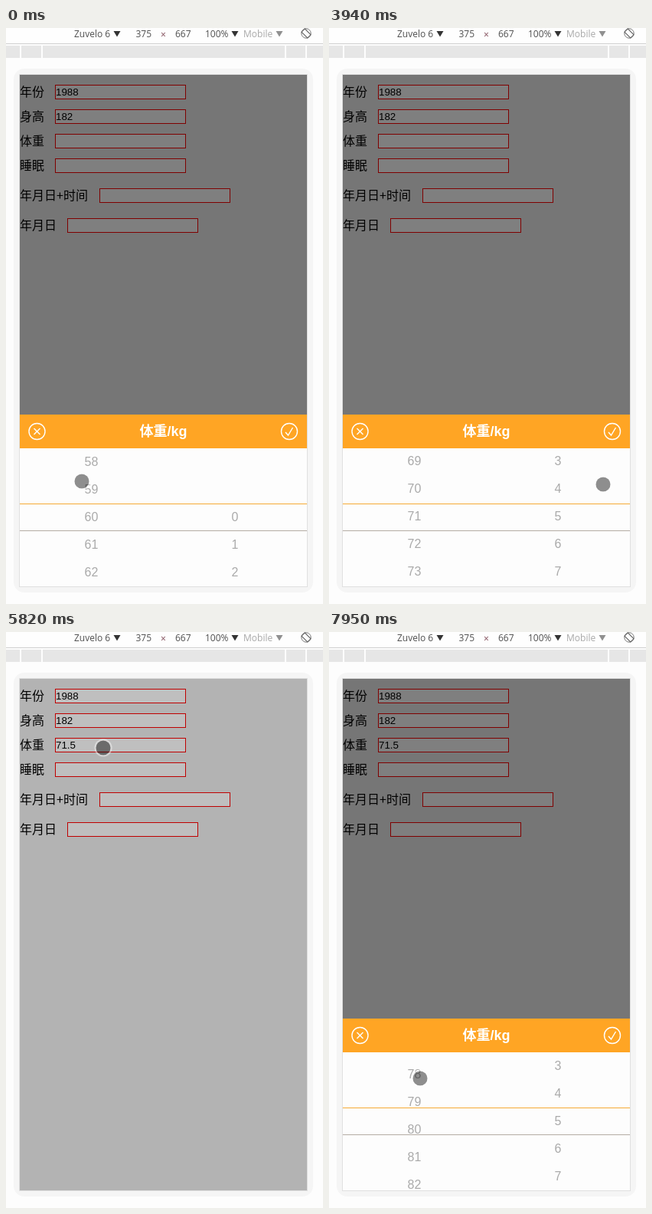
These frames come from a looping animation (414x751 px, 8000 ms). An HTML page with a canvas:

```html
<!DOCTYPE html>
<html lang="zh-CN">
<head>
<meta charset="utf-8">
<title>体重</title>
<style>
html, body { margin: 0; width: 100%; height: 100%; overflow: hidden; background: #fdfdfd; }
canvas { display: block; width: 414px; height: 751px; }
</style>
</head>
<body>
<canvas id="stage"></canvas>
<script>
const W = 414, H = 751, LOOP = 8000;
const canvas = document.getElementById('stage');
const ctx = canvas.getContext('2d');
const dpr = window.devicePixelRatio || 1;
canvas.width = W * dpr;
canvas.height = H * dpr;

const SCREEN = { x: 18, y: 61, w: 375, h: 667 };
const ORANGE = '#ffa524';
const UI = '12px "Open Sans", "Noto Sans", sans-serif';
const CJK = '16px "Noto Sans CJK SC", "Noto Sans CJK", sans-serif';
const TITLE = 'bold 18px "Liberation Sans", "Noto Sans CJK SC", "Noto Sans CJK", sans-serif';
const ARIAL = '"Liberation Sans", Arial, sans-serif';

// The screen refreshes in bursts: [first, last, refreshes]
const BURSTS = [
  [150, 1140, 9], [1300, 2310, 8], [2430, 3390, 8], [3510, 3510, 1],
  [3940, 4360, 4], [4640, 5540, 8], [5820, 6860, 8], [6980, 7950, 8]
];

// Each key is [time, ...values]
const POINTER = [
  [0, 99, 591], [400, 107, 668], [520, 110, 672], [900, 113, 580], [1140, 117, 585],
  [1300, 130, 646], [1444, 138, 647], [1733, 146, 565], [1880, 180, 580],
  [2310, 281.5, 640], [2567, 286, 680], [2980, 300, 580], [3390, 325.5, 635],
  [3510, 325.5, 635], [3940, 358, 595], [4080, 377, 545], [4220, 373, 530],
  [4769, 373, 530], [4900, 345, 470], [5280, 190, 240], [5540, 127, 151],
  [5820, 127, 151], [5969, 125, 190], [6117, 122, 295], [6560, 113, 590],
  [6860, 109, 690], [6980, 108, 697], [7260, 105, 575], [7535, 109, 724],
  [7650, 111, 720], [7950, 119, 582]
];
const KILOS = [
  [0, 60], [520, 60], [900, 62.6], [1140, 64], [1300, 64], [1444, 64.06],
  [1733, 66.4], [1880, 69], [2020, 70.5], [2160, 71.03], [4640, 71.03], [5540, 71],
  [6980, 71], [7260, 74.3], [7400, 75.5], [7535, 75.9], [7650, 76], [7950, 79.69]
];
const TENTHS = [
  [0, 0], [2567, 0], [2980, 2.8], [3250, 4.4], [3390, 4.7], [3510, 5.03],
  [4640, 5.03], [5540, 5]
];
const PANEL = [
  [4360, 1], [4640, 0.65], [4769, 0.125], [4890, 0], [5820, 0], [5969, 0.65], [6110, 1]
];
const SHADE = [
  [4769, 1], [4897, 0.35], [5020, 0], [5540, 0], [5820, 0.5], [5969, 1]
];

function at(keys, t) {
  let a = keys[0];
  for (const b of keys) {
    if (t < b[0]) {
      if (a === b) break;
      const u = (t - a[0]) / (b[0] - a[0]);
      return a.slice(1).map((v, i) => v + (b[i + 1] - v) * u);
    }
    a = b;
  }
  return a.slice(1);
}

function refreshTime(t) {
  let now = 0;
  for (const [first, last, n] of BURSTS) {
    if (t < first) break;
    const step = (last - first) / Math.max(1, n - 1);
    const k = step ? Math.min(n - 1, Math.floor((t - first) / step + 0.1)) : 0;
    now = first + k * step;
  }
  return now;
}

function box(x, y, w, h, color) {
  ctx.fillStyle = color;
  ctx.fillRect(x, y, w, h);
}

function label(str, x, y, font, color, align = 'left') {
  ctx.font = font;
  ctx.fillStyle = color;
  ctx.textAlign = align;
  ctx.fillText(str, x, y);
}

function path(points, color, width) {
  ctx.beginPath();
  points.forEach(([x, y]) => ctx.lineTo(x, y));
  ctx.strokeStyle = color;
  ctx.lineWidth = width;
  ctx.stroke();
}

function ring(x, y, r, color, width) {
  ctx.beginPath();
  ctx.arc(x, y, r, 0, Math.PI * 2);
  ctx.strokeStyle = color;
  ctx.lineWidth = width;
  ctx.stroke();
}

function arrow(x, color) {
  ctx.beginPath();
  ctx.moveTo(x, 4);
  ctx.lineTo(x + 9, 4);
  ctx.lineTo(x + 4.5, 11.5);
  ctx.fillStyle = color;
  ctx.fill();
}

function toolbar() {
  box(0, 0, W, 20, '#fefefe');
  box(0, 20, W, 1, '#cfcfcf');
  const dark = '#505050', pale = '#a8a8a8';
  label('Zuvelo 6', 89, 12, UI, dark);
  arrow(140.5, '#333');
  label('375', 169.5, 12, UI, dark);
  label('×', 202, 13, UI, '#84505c');
  label('667', 221, 12, UI, dark);
  label('100%', 260, 12, UI, dark);
  arrow(294.5, '#333');
  label('Mobile', 310, 12, UI, pale);
  arrow(352.5, '#909090');

  ring(392, 7, 6.2, '#777', 1);
  ctx.save();
  ctx.translate(392, 7);
  ctx.rotate(-Math.PI / 4);
  box(-3, -6, 6, 12, '#fefefe');
  ctx.strokeStyle = '#555';
  ctx.strokeRect(-3, -5.5, 6, 11);
  ctx.restore();

  [[0, 18], [20, 46], [48, 364], [366, 391], [393, W]]
    .forEach(([a, b]) => box(a, 23, b - a, 16, '#e6e6e6'));
}

function device() {
  ctx.beginPath();
  ctx.roundRect(10, 53, 391, 683, 14);
  ctx.fillStyle = '#f5f5f5';
  ctx.fill();
  box(17, 60, 377, 669, '#e0e0e0');
  box(SCREEN.x, SCREEN.y, SCREEN.w, SCREEN.h, '#eee');
}

function field(name, x, y, value = '') {
  label(name, 18, y + 15, CJK, '#000');
  box(x, y, 171, 19, '#f00');
  box(x + 1, y + 1, 169, 17, '#fff');
  label(value, x + 1, y + 14, '13.333px ' + ARIAL, '#000');
}

function form(t) {
  field('年份', 64, 74, '1988');
  field('身高', 64, 106, '182');
  field('体重', 64, 138, t >= 4640 ? '71.5' : '');
  field('睡眠', 64, 170);
  field('年月日+时间', 122, 209);
  field('年月日', 80, 248);
}

function wheel(x, pos, max) {
  const from = Math.max(0, Math.floor(pos) - 3);
  const to = Math.min(max, Math.ceil(pos) + 3);
  for (let v = from; v <= to; v++) {
    label(v, x, Math.round(643 + 36 * (v - pos)), '16px ' + ARIAL, '#aaa', 'center');
  }
}

function picker(t) {
  const [shown] = at(PANEL, t);
  if (shown <= 0) return;
  ctx.save();
  ctx.globalAlpha = shown;
  ctx.translate(0, Math.round((1 - shown) * 224));
  box(18, 504, 375, 44, ORANGE);
  label('体重/kg', 205.5, 532, TITLE, '#fff', 'center');
  ring(40.5, 526, 10.5, '#fff', 1.4);
  path([[36.5, 522], [44.5, 530]], '#fff', 1.4);
  path([[44.5, 522], [36.5, 530]], '#fff', 1.4);
  ring(370, 526, 10.5, '#fff', 1.4);
  path([[365, 527], [368.5, 531], [374.5, 521]], '#fff', 1.4);

  box(18, 548, 375, 180, '#fdfdfd');
  ctx.beginPath();
  ctx.rect(18, 548, 375, 180);
  ctx.clip();
  wheel(111.4, at(KILOS, t)[0], 200);
  wheel(298.9, at(TENTHS, t)[0], 9);
  box(18, 620, 375, 1, '#f5ab35');
  box(18, 655, 375, 1, '#b4aca4');
  ctx.restore();
}

function pointer(t) {
  const [x, y] = at(POINTER, t);
  ctx.beginPath();
  ctx.arc(x, y, 9.6, 0, Math.PI * 2);
  ctx.fillStyle = 'rgba(0,0,0,.44)';
  ctx.fill();
  ring(x, y, 10.6, 'rgba(255,255,255,.42)', 2);
}

function draw(ms) {
  const t = refreshTime(ms % LOOP);
  ctx.setTransform(dpr, 0, 0, dpr, 0, 0);
  box(0, 0, W, H, '#fdfdfd');
  toolbar();
  device();
  ctx.save();
  ctx.beginPath();
  ctx.rect(SCREEN.x, SCREEN.y, SCREEN.w, SCREEN.h);
  ctx.clip();
  form(t);
  box(SCREEN.x, SCREEN.y, SCREEN.w, SCREEN.h, `rgba(0,0,0,${0.5 * at(SHADE, t)[0]})`);
  picker(t);
  pointer(t);
  ctx.restore();
}

const start = performance.now();
function tick() {
  draw(performance.now() - start);
  requestAnimationFrame(tick);
}
tick();
</script>
</body>
</html>
```
